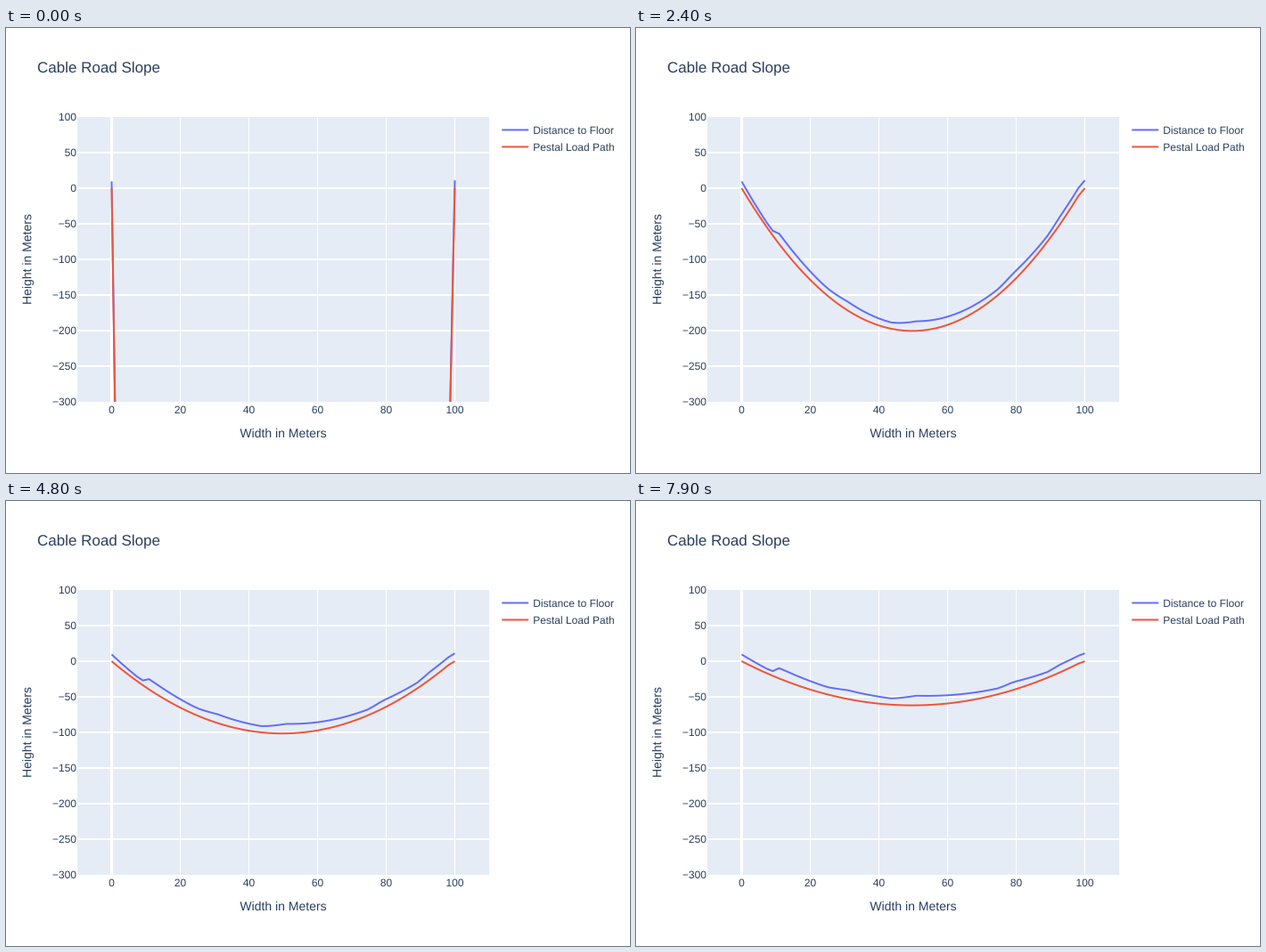
These frames come from a looping animation (700x500 px, 8 s). A matplotlib script:

```python
import matplotlib.pyplot as plt
import numpy as np
from matplotlib.animation import FuncAnimation
from matplotlib.patches import PathPatch, Rectangle
from matplotlib.textpath import TextPath
from matplotlib.transforms import Affine2D

plt.rcParams["font.family"] = "Liberation Sans"

W, H, DPI = 700, 500, 100
FRAMES, INTERVAL = 80, 100
LEFT, TOP, PLOT_W, PLOT_H = 80, 100, 462, 320
INK, PANEL = "#2a3f5f", "#E5ECF6"
BLUE, RED = "#636EFA", "#EF553B"
LINE = dict(lw=2 * 72 / DPI, solid_capstyle="butt",
            solid_joinstyle="miter", snap=False)

fig = plt.figure(figsize=(W / DPI, H / DPI), dpi=DPI, facecolor="white")

# Pixel-based backdrop with y pointing down
page = fig.add_axes([0, 0, 1, 1])
page.set(xlim=(0, W), ylim=(H, 0))
page.axis("off")

# Data area on top of it
ax = fig.add_axes([LEFT / W, 1 - (TOP + PLOT_H) / H, PLOT_W / W, PLOT_H / H])
ax.set(xlim=(-10, 110), ylim=(-300, 100))
ax.axis("off")


def box(x, y, w, h, color):
    page.add_patch(Rectangle((x, y), w, h, fc=color, lw=0, antialiased=False))


def advance(text, size):
    """Text width including side bearings."""
    def end(s):
        return TextPath((0, 0), s, size=size).get_extents().x1
    return end(text + "0") - end("0")


def label(x, y, text, size=12, align=0.0, angle=0):
    """Draw text on baseline y; align is 0 left, 0.5 centre, 1 right."""
    start = -align * advance(text, size)
    place = Affine2D().scale(1, -1).rotate_deg(-angle).translate(x, y)
    page.add_patch(PathPatch(TextPath((start, 0), text, size=size), fc=INK,
                             lw=0, snap=False, transform=place + page.transData))


def to_x(value):
    return LEFT + (value + 10) * PLOT_W / 120


def to_y(value):
    return TOP + (100 - value) * PLOT_H / 400


box(LEFT, TOP, PLOT_W, PLOT_H, PANEL)
for v in range(0, 101, 20):
    w = 1 if v else 3
    box(to_x(v) - w / 2, TOP, w, PLOT_H, "white")
    label(to_x(v), 433, str(v), align=0.5)
for v in range(-300, 101, 50):
    y = to_y(v)
    if -300 < v < 100:
        box(LEFT, y - 1, PLOT_W, 2, "white")
    label(79, y + 4, str(v).replace("-", "\u2212"), align=1)

label(35, 50, "Cable Road Slope", 17)
label(LEFT + PLOT_W / 2, 460, "Width in Meters", 14, align=0.5)
label(28.3, TOP + PLOT_H / 2, "Height in Meters", 14, align=0.5, angle=90)

legend_x = LEFT + 1.02 * PLOT_W
for y, color, name in ((114.5, BLUE, "Distance to Floor"),
                       (133.5, RED, "Pestal Load Path")):
    page.plot([legend_x + 5, legend_x + 35], [y, y], color=color, **LINE)
    label(legend_x + 40, y + 4.5, name)

# Parabolic load path, pinned to zero at the far support
SPAN = 99.5
xs = np.linspace(0, 100, 56)
shape = np.maximum(4 * xs * (SPAN - xs) / SPAN**2, 0)

# Clearance between floor and path: corners of a rough slope
corners = [0, 8, 9, 11, 25, 31, 44, 51, 75, 79, 89, 93, 100]
heights = [9.5, 6, 6.3, 14.8, 10.2, 12.4, 8.7, 13.5, 8.2, 11.1, 8, 11, 11]
gap = np.interp(xs, corners, heights)

floor, = ax.plot([], [], color=BLUE, **LINE)
path, = ax.plot([], [], color=RED, **LINE)


def update(i):
    # Sag falls inversely with the steadily rising cable tension
    sag = 4936 / (i + 0.62)
    path.set_data(xs, -sag * shape)
    floor.set_data(xs, gap - sag * shape)
    return floor, path


anim = FuncAnimation(fig, update, frames=FRAMES, interval=INTERVAL,
                     repeat=True, repeat_delay=0)
plt.show()
```
